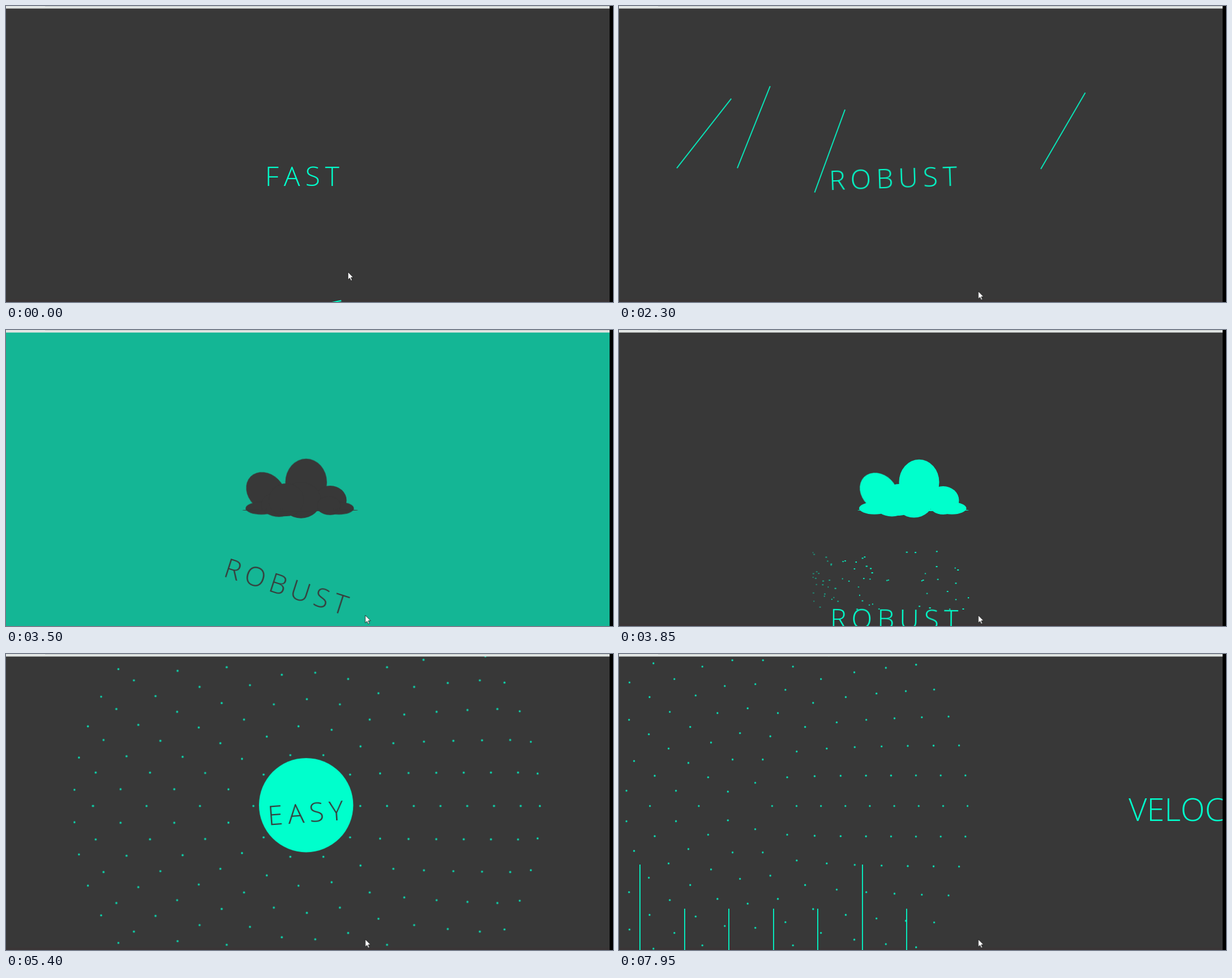
Recreate the animation shown at these times as an HTML page. Size 1072 by 523 pixels, loop 8 s.

```html
<!DOCTYPE html>
<html lang="en">
<head>
<meta charset="utf-8">
<title>Fast, robust, easy</title>
<style>
  html, body { margin: 0; height: 100%; overflow: hidden; background: #000; }
  svg { display: block; width: 1072px; height: 523px; }
  text { font: 300 48px "Open Sans", sans-serif; letter-spacing: 9px; font-kerning: none; fill: currentColor; }
  #stage { color: #0fc; }
  .move { animation: 8s linear infinite; }

  /* 1% = 80ms */
  #fast { animation-name: fast; }
  @keyframes fast {
    0%, 18.75% { transform: translate(527px, 301px); animation-timing-function: ease-in; }
    23.1%, 100% { transform: translate(527px, 560px) rotate(14deg); }
  }

  .streak { animation-name: streak; opacity: 0; }
  @keyframes streak {
    0% { transform: translate(196px, -340px); opacity: 1; }
    4.99% { transform: translate(-196px, 340px); opacity: 1; }
    5%, 100% { transform: translate(-196px, 340px); opacity: 0; }
  }

  .blade { animation-name: blade; }
  @keyframes blade {
    0%, 22.5% { transform: rotate(calc(var(--a) + 16deg)) scaleY(0); animation-timing-function: ease-out; }
    25.5% { transform: rotate(calc(var(--a) + 15deg)); animation-timing-function: ease-out; }
    28.75% { transform: rotate(var(--a)); animation-timing-function: ease-in-out; }
    32% { transform: rotate(calc(var(--a) + 10deg)); animation-timing-function: ease-in; }
    35%, 100% { transform: rotate(calc(var(--a) + 40deg)) scaleY(0); }
  }

  #sky { animation-name: ink; }
  @keyframes ink {
    0%, 42.49%, 45%, 100% { color: #0fc; }
    42.5%, 44.99% { color: #383838; }
  }
  #flash { animation-name: flash; }
  @keyframes flash {
    0%, 42.49% { opacity: 0; }
    42.5% { opacity: .9; }
    43.75% { opacity: .64; }
    46.25%, 100% { opacity: 0; }
  }

  #robust { animation-name: robust; }
  @keyframes robust {
    0%, 23.75% { transform: translate(483px, 560px) rotate(-12deg); animation-timing-function: ease-out; }
    28.75% { transform: translate(482px, 304.5px) rotate(-2deg); animation-timing-function: ease-out; }
    31%, 32.5% { transform: translate(483px, 301px); animation-timing-function: ease-in-out; }
    36.5%, 38% { transform: translate(484px, 440px); animation-timing-function: ease-in-out; }
    43.75% { transform: translate(493px, 452.7px) rotate(17.9deg); animation-timing-function: ease-in; }
    48.1% { transform: translate(484px, 510px) rotate(.6deg); }
    50.5%, 100% { transform: translate(484px, 565px) rotate(-3deg); }
  }

  .puff { animation-name: puff; transform-box: fill-box; transform-origin: center; }
  @keyframes puff {
    0%, 34.4% { transform: scale(0); animation-timing-function: cubic-bezier(.3, 1.5, .6, 1); }
    39%, 42.4% { transform: none; }
    42.8%, 43.75% { transform: scale(1.035); }
    46%, 56.25% { transform: none; animation-timing-function: ease-in; }
    60%, 100% { transform: scale(0); }
  }

  .drop { animation-name: drop; opacity: 0; }
  @keyframes drop {
    0%, 44.49% { transform: none; opacity: 0; }
    44.5% { transform: none; opacity: 0; }
    46% { opacity: var(--o); }
    50% { opacity: var(--o); }
    55%, 100% { transform: translate(var(--dx), var(--dy)); opacity: 0; }
  }

  #pan { animation-name: pan; }
  @keyframes pan {
    0%, 94.375% { transform: none; animation-timing-function: cubic-bezier(.333, 0, .667, .333); }
    99.375% { transform: translateX(-302.5px); }
    100% { transform: translateX(-382px); }
  }
  #dots { animation-name: dots; }
  @keyframes dots {
    0%, 63.74% { transform: translate(531.3px, 268.5px) scale(1.1); opacity: 0; }
    63.75% { transform: translate(531.3px, 268.5px) scale(1.1); opacity: 1; }
    67.5% { transform: translate(531.3px, 268.5px) scale(1.094); animation-timing-function: cubic-bezier(.35, .4, .6, 1); }
    75% { transform: translate(531.3px, 268.5px) scale(1.012); animation-timing-function: ease-out; }
    80%, 100% { transform: translate(531.3px, 268.5px); opacity: 1; }
  }
  .ring { animation-name: ring; }
  @keyframes ring {
    0%, 63.75% { transform: scale(0); animation-timing-function: cubic-bezier(.33, 1, .68, 1); }
    65%, 100% { transform: none; }
  }
  #disc { animation-name: disc; }
  @keyframes disc {
    0%, 60% { transform: translate(530px, 267px) scale(0); animation-timing-function: ease-out; }
    63.75% { transform: translate(530px, 267px) scale(.78); animation-timing-function: ease-out; }
    65.8% { transform: translate(530px, 267px) scale(1.18); }
    67.5% { transform: translate(530px, 267px) scale(1.153); animation-timing-function: cubic-bezier(.35, .4, .6, 1); }
    75% { transform: translate(530px, 267px) scale(1.02); animation-timing-function: ease-out; }
    80%, 89% { transform: translate(530px, 267px); animation-timing-function: ease-in; }
    93.5%, 100% { transform: translate(530px, 267px) scale(0); }
  }
  #easy { color: #383838; animation-name: easy; }
  @keyframes easy {
    0%, 62% { transform: translate(522px, 560px) rotate(-18deg); animation-timing-function: ease-out; }
    67.5% { transform: translate(529px, 280px) rotate(-4.2deg); animation-timing-function: ease-out; }
    71%, 89% { transform: translate(531px, 271.5px); animation-timing-function: ease-in; }
    93.5%, 100% { transform: translate(531px, 268px) scale(0); }
  }

  #ticks { animation-name: ticks; }
  @keyframes ticks { 0%, 94.99% { opacity: 0; } 95%, 100% { opacity: .88; } }
  .tick { animation-name: tick; }
  @keyframes tick {
    0%, 95% { transform: scaleY(0); animation-timing-function: ease-out; }
    95.65%, 100% { transform: none; }
  }

  #cursor { animation-name: cursor; }
  @keyframes cursor {
    0%, 12.5% { transform: translate(604px, 470px); animation-timing-function: ease-in-out; }
    18.75%, 100% { transform: translate(634.5px, 504px); }
  }
</style>
</head>
<body>
<svg viewBox="0 0 1072 523">
  <g id="stage">
    <rect width="1072" height="523" fill="#383838"/>
    <rect y="519" width="1066" height="4" fill="#3a3536"/>
    <rect id="flash" class="move" width="1066" height="523" fill="#0fc"/>

    <g id="streaks" stroke="#0fc" stroke-width="1.7"></g>
    <g id="blades" stroke="#0fc" stroke-width="1.7"></g>
    <g id="fast" class="move"><text x="-69.5" y="17">FAST</text></g>

    <g id="sky" class="move">
      <g id="cloud" fill="currentColor"></g>
      <g id="rain" fill="currentColor"></g>
      <g id="robust" class="move"><text x="-111" y="17">ROBUST</text></g>
    </g>

    <g id="pan" class="move">
      <g id="dots" class="move" fill="#0fc"></g>
      <circle id="disc" class="move" r="72.2" fill="#0fc"/>
      <g id="easy" class="move"><text x="-67" y="17.5">EASY</text></g>
      <text x="1204" y="295" style="font-size:56px;letter-spacing:0">VELOCITY</text>
    </g>
    <g id="ticks" class="move" stroke="#0fc" stroke-width="2"></g>
  </g>

  <rect width="1066" height="4.5" fill="#e1e5e3"/>
  <rect x="69" width="997" height="1" fill="#c9cdcb"/>
  <rect x="1066" width="6" height="523"/>
  <path id="cursor" class="move" d="M0 0V13.5L3.1 10.7 5.2 15.4 7.4 14.4 5.3 9.8H9.4Z" fill="#fff" stroke="#111" stroke-width=".8"/>
</svg>
<script>
  const NS = 'http://www.w3.org/2000/svg';
  const get = id => document.getElementById(id);

  function add(parent, tag, attrs) {
    const el = document.createElementNS(NS, tag);
    for (const k in attrs) el.setAttribute(k, attrs[k]);
    return parent.appendChild(el);
  }
  // Negative delay keeps every copy on the same 8s clock.
  const delay = ms => `animation-delay:${ms - 8000}ms`;

  let seed = 11;
  const rand = () => (seed = seed * 16807 % 2147483647) / 2147483647;

  // streaks rushing past the first word
  for (let i = 0; i < 12; i++) {
    const x = 60 + (i * 397) % 940;
    add(get('streaks'), 'line', { class: 'move streak', style: delay(60 + i * 95),
      x1: x - 39, y1: 329, x2: x + 39, y2: 194 });
  }

  // blades: foot x, foot y, lean
  [[102, 286.5, 38.1], [209, 286.5, 21.8], [345.5, 329.5, 20.1], [745, 288, 30.2]].forEach(([x, y, a]) => {
    const foot = add(get('blades'), 'g', { transform: `translate(${x} ${y})` });
    add(foot, 'line', { class: 'move blade', style: `--a:${a}deg`, y2: -156 });
  });

  // cloud puffs: cx, cy, rx, ry, tilt
  [[459, 286, 37, 30, 45], [530, 269, 35.5, 40.3], [572.5, 301, 28, 25], [521, 301, 34, 30.5],
   [451, 315, 27, 10.7], [482, 308, 30, 21.5], [588, 315, 25.5, 10.7], [570, 310, 20, 15.5],
   [495, 300, 30, 28], [519.5, 318.3, 98.5, 1.8]].forEach(([cx, cy, rx, ry, tilt = 0], i) => {
    const g = add(get('cloud'), 'g', { transform: `rotate(${tilt} ${cx} ${cy})` });
    add(g, 'ellipse', { class: 'move puff', style: delay(i * 6), cx, cy, rx, ry });
  });

  // rain: each drop passes (x, y) at 3850ms
  for (let i = 0; i < 66; i++) {
    const u = rand() ** 1.7, x = 342 + 274 * u, y = 390 + 102 * rand();
    const x0 = 425 + 190 * u, y0 = 326, k = 840 / 290;
    const o = Math.min(1, .4 + u * 2.2), w = 1.5 + rand() * 1.7;
    add(get('rain'), 'rect', { class: 'move drop', x: x0, y: y0, width: w, height: 2,
      style: `--dx:${(x - x0) * k}px;--dy:${(y - y0) * k}px;--o:${o}` });
  }

  // nine rings with 5, 10, 15 ... dots
  for (let k = 1; k <= 9; k++) {
    const ring = add(get('dots'), 'g', { class: 'move ring', style: delay((k - 1) * 29) });
    for (let i = 0, n = 5 * k; i < n; i++) {
      const a = i / n * 2 * Math.PI, r = 43.15 * k;
      add(ring, 'circle', { cx: r * Math.cos(a), cy: r * Math.sin(a), r: 1.55 });
    }
  }

  // ruler ticks, every fifth one tall
  for (let i = 0; i < 7; i++) {
    const foot = add(get('ticks'), 'g', { transform: `translate(${37.3 + i * 78.45} 523)` });
    add(foot, 'line', { class: 'move tick', style: delay(i * 50), y2: i % 5 ? -73 : -151 });
  }
</script>
</body>
</html>
```
